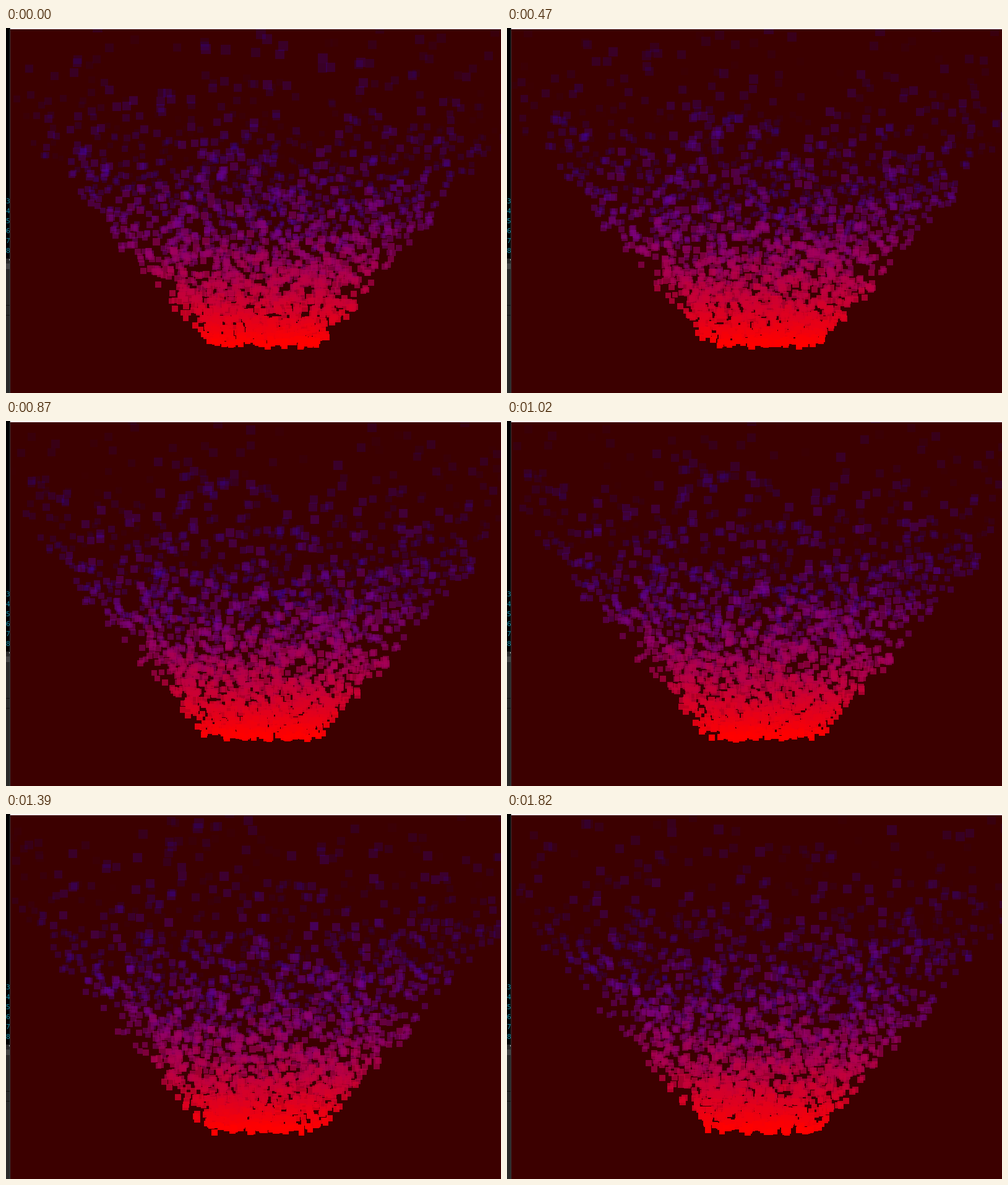
An HTML page with a canvas that plays this animation: 800x589 px, repeating every 1920 ms.

```html
<!DOCTYPE html>
<html lang="en">
<head>
<meta charset="utf-8">
<title>Particle fountain</title>
<style>
  html, body { margin: 0; width: 100%; height: 100%; overflow: hidden; background: #3c0000; }
  canvas { position: absolute; left: 0; top: 0; }
  .strip {
    position: absolute; left: 0; top: 0; width: 6px; height: 589px; overflow: hidden;
    background: linear-gradient(#000 372px, #292929 372px); border-right: 1px solid #3a3d40;
  }
  .strip i { position: absolute; left: 0; width: 6px; }
  .lines {
    position: absolute; left: 0; top: 272px; margin: 0; color: #168fa8;
    font: 11px/16px "DejaVu Sans Mono", monospace; letter-spacing: 0;
  }
</style>
</head>
<body>
<canvas width="800" height="589"></canvas>
<div class="strip">
  <pre class="lines">3
4
5
6
7
8</pre>
  <i style="top:380px;height:9px;background:#444"></i>
  <i style="top:447px;height:1px;background:#111"></i>
  <i style="top:463px;height:1px;background:#111"></i>
  <i style="top:373px;left:5px;width:1px;height:2px;background:#bbb"></i>
</div>
<script>
const ctx = document.querySelector('canvas').getContext('2d');

// The picture holds between these times
const LOOP = 1920;
const STEPS = [0, 90, 200, 280, 370, 470, 550, 630, 710, 790, 870, 950, 1030, 1100,
  1190, 1290, 1390, 1490, 1580, 1670, 1750, 1820];

// Camera and fountain, lengths in pixels at the emitter's depth
const VANISH_X = 403, OFFSET_X = 14, HORIZON = 510, FOCUS = 880;
const RADIUS = 91, SPREAD = 64, RISE = 70;
const LIFE = 5.2, RATE = 430, SIZE = 9.6;

let seed = 4711;
function random() {
  seed = (seed + 0x6D2B79F5) | 0;
  let n = Math.imul(seed ^ (seed >>> 15), 1 | seed);
  n = (n + Math.imul(n ^ (n >>> 7), 61 | n)) ^ n;
  return ((n ^ (n >>> 14)) >>> 0) / 4294967296;
}

// A random point of the disc sets both the start and the outward direction
function emit(born) {
  const angle = random() * Math.PI * 2;
  const reach = Math.sqrt(random());
  return {
    born,
    kx: Math.cos(angle) * reach,
    kz: Math.sin(angle) * reach,
    speed: 0.95 + random() * 0.1,
    lift: random() * 8 - 5
  };
}

const count = Math.round((LIFE + LOOP / 1000) * RATE);
const particles = Array.from({ length: count }, (_, i) => emit(i / RATE - LIFE));

function drawParticle(p, time) {
  const age = time - p.born;
  const t = age / LIFE;
  if (t < 0 || t >= 1) return;
  const travel = p.speed * age * (0.86 + 0.03 * age);
  const width = RADIUS + SPREAD * travel;
  const scale = FOCUS / (FOCUS - p.kz * width);
  const x = VANISH_X + (OFFSET_X + p.kx * width) * scale;
  const y = HORIZON - (RISE * travel + p.lift) * scale;
  const size = Math.round(SIZE * scale);
  ctx.globalAlpha = 1 - t;
  ctx.fillStyle = `rgb(${Math.round(255 * (1 - t))},0,${Math.round(255 * t)})`;
  ctx.fillRect(Math.round(x - size / 2), Math.round(y - size / 2), size, size);
}

function draw(ms) {
  ctx.globalAlpha = 1;
  ctx.fillStyle = '#3c0000';
  ctx.fillRect(0, 0, 800, 589);
  for (const p of particles) drawParticle(p, ms / 1000);
  ctx.globalAlpha = 1;
  ctx.fillStyle = '#fff';
  ctx.fillRect(7, 0, 793, 2);
}

const start = performance.now();
let shown = -1;
function tick() {
  const ms = (performance.now() - start) % LOOP;
  const step = STEPS.findLast(s => s <= ms) ?? 0;
  if (step !== shown) draw(shown = step);
  requestAnimationFrame(tick);
}
tick();
</script>
</body>
</html>
```
